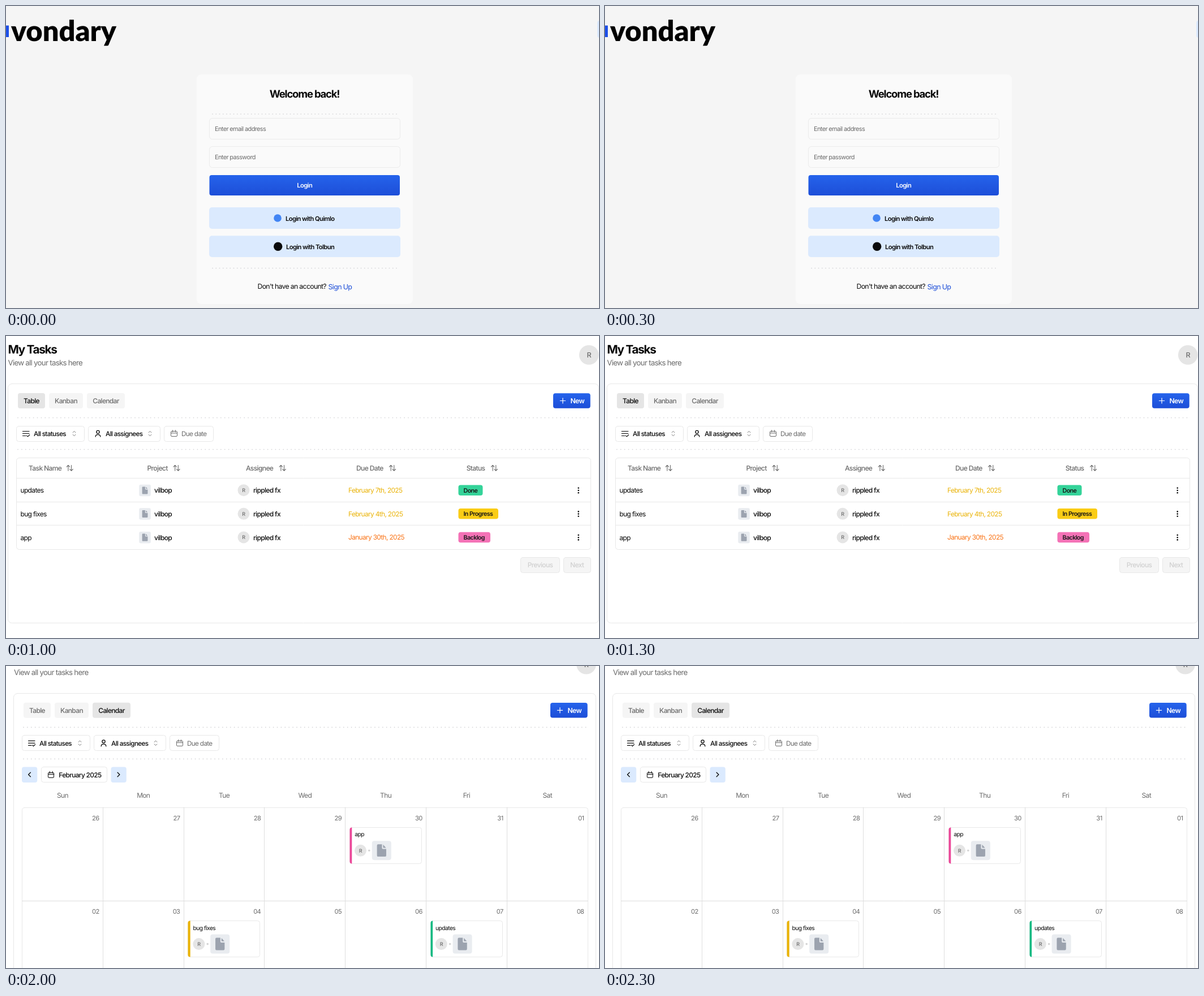
These frames come from a looping animation (1048 px wide and 534 px high, 2.5 s). An HTML page with a canvas:

```html
<!DOCTYPE html>
<html lang="en">
<head>
<meta charset="utf-8">
<title>Task manager tour</title>
<style>
  html, body { margin: 0; width: 100%; height: 100%; overflow: hidden; background: #fff; }
  canvas { display: block; width: 1048px; height: 534px; }
</style>
</head>
<body>
<canvas id="stage" width="1048" height="534"></canvas>
<script>
const ctx = document.getElementById('stage').getContext('2d');
const W = 1048, H = 534, HOLD = 500;
const INK = '#0a0a0a', GRAY = '#6b6b6b', LINE = '#e8e8e8', FILL = '#e5e5e5', PALE = '#f5f5f5', SKY = '#dbeafe';
const BLUE = '#1d4ed8', GREEN = '#10b981', YELLOW = '#eab308', ORANGE = '#f97316';
const BRAND = 'vondary', PROJECT = 'vilbop', USER = 'rippled fx';
const TASKS = [
  { name: 'updates', days: 12, due: 'February 7th, 2025', tone: YELLOW, status: 'Done', fill: '#34d399', badge: 43 },
  { name: 'bug fixes', days: 9, due: 'February 4th, 2025', tone: YELLOW, status: 'In Progress', fill: '#facc15', badge: 70.5 },
  { name: 'app', days: 4, due: 'January 30th, 2025', tone: ORANGE, status: 'Backlog', fill: '#f472b6', badge: 56.5 }
];

// y is the middle of the capitals
function text(s, x, y, size = 12, weight = 400, color = INK, align = 'left') {
  ctx.font = `${weight} ${size}px Inter, sans-serif`;
  ctx.letterSpacing = `${size * (size > 16 ? -0.065 : -0.055)}px`;
  ctx.textAlign = align;
  ctx.fillStyle = color;
  ctx.fillText(s, x, y + size * 0.36);
}

function brand(x, base, size, align) {
  ctx.font = `900 ${size}px Lato, sans-serif`;
  ctx.letterSpacing = '0px';
  ctx.textAlign = align;
  ctx.fillStyle = '#000';
  ctx.fillText(BRAND, x, base);
}

// Outlined boxes snap to pixel centres to keep a crisp hairline
function box(x1, y1, x2, y2, r, fill, stroke) {
  if (stroke) [x1, y1, x2, y2] = [x1, y1, x2, y2].map(v => Math.floor(v) + 0.5);
  ctx.beginPath();
  ctx.roundRect(x1, y1, x2 - x1, y2 - y1, r);
  if (fill) { ctx.fillStyle = fill; ctx.fill(); }
  if (stroke) { ctx.strokeStyle = stroke; ctx.lineWidth = 1; ctx.stroke(); }
}

function disc(x, y, r, fill) {
  ctx.beginPath();
  ctx.arc(x, y, r, 0, 7);
  ctx.fillStyle = fill;
  ctx.fill();
}

function ring(x, y, r, color, dash = []) {
  ctx.beginPath();
  ctx.arc(x, y, r, 0, Math.PI * 2);
  ctx.strokeStyle = color;
  ctx.lineWidth = 1.3;
  ctx.setLineDash(dash);
  ctx.stroke();
  ctx.setLineDash([]);
}

// Each path is a flat list of x, y offsets from the centre
function lines(x, y, color, width, ...paths) {
  ctx.beginPath();
  for (const p of paths)
    for (let i = 0; i < p.length; i += 2)
      i ? ctx.lineTo(x + p[i], y + p[i + 1]) : ctx.moveTo(x + p[i], y + p[i + 1]);
  ctx.strokeStyle = color;
  ctx.lineWidth = width;
  ctx.stroke();
}

function dots(x1, x2, y, step = 6.9) {
  for (let x = x1; x <= x2; x += step) disc(x, y, 0.85, '#d0d0d3');
}

function dotsDown(x, y1, y2, step) {
  for (let y = y1; y <= y2; y += step) disc(x, y, 0.85, '#d0d0d3');
}

function plus(x, y, r, color, width = 1.2) {
  lines(x, y, color, width, [-r, 0, r, 0], [0, -r, 0, r]);
}

function addDisc(x, y) {
  disc(x, y, 6.6, '#6f6f6f');
  plus(x, y, 3.4, '#fff', 1.4);
}

function blueFill(y1, y2) {
  const g = ctx.createLinearGradient(0, y1, 0, y2);
  g.addColorStop(0, '#2563eb');
  g.addColorStop(1, BLUE);
  return g;
}

function avatar(x, y, r = 10.5, size = 9) {
  disc(x, y, r, FILL);
  text('R', x, y, size, 500, GRAY, 'center');
}

function upDown(x, y) {
  lines(x, y, '#777', 1, [-2.4, -1.8, 0, -4.2, 2.4, -1.8], [-2.4, 1.8, 0, 4.2, 2.4, 1.8]);
}

function sortIcon(x, y) {
  lines(x, y, GRAY, 1.1, [-5.5, -2, -2.8, -4.8, -0.1, -2], [-2.8, -4.8, -2.8, 5],
    [0.1, 2.2, 2.8, 5, 5.5, 2.2], [2.8, 5, 2.8, -4.8]);
}

function calendar(x, y, s, color) {
  const r = s / 2;
  box(x - r, y - r * 0.8, x + r, y + r, s * 0.14, null, color);
  lines(x, y, color, 1, [-r, -r * 0.15, r, -r * 0.15],
    [-r * 0.45, -r * 1.15, -r * 0.45, -r * 0.5], [r * 0.45, -r * 1.15, r * 0.45, -r * 0.5]);
}

function person(x, y) {
  ring(x, y - 2.8, 2.6, INK);
  ctx.beginPath();
  ctx.moveTo(x - 4.3, y + 5.6);
  ctx.bezierCurveTo(x - 4.3, y + 0.6, x + 4.3, y + 0.6, x + 4.3, y + 5.6);
  ctx.stroke();
}

function fileTile(x, y, s) {
  box(x, y, x + s, y + s, s * 0.12, '#e9ecf0');
  ctx.save();
  ctx.translate(x + s * 0.26, y + s * 0.18);
  ctx.scale(s * 0.48, s * 0.64);
  ctx.fillStyle = '#9ca3af';
  ctx.beginPath();
  ctx.moveTo(0.12, 0);
  ctx.lineTo(0.54, 0);
  ctx.lineTo(0.54, 0.3);
  ctx.quadraticCurveTo(0.54, 0.38, 0.64, 0.38);
  ctx.lineTo(1, 0.38);
  ctx.lineTo(1, 0.9);
  ctx.quadraticCurveTo(1, 1, 0.87, 1);
  ctx.lineTo(0.12, 1);
  ctx.quadraticCurveTo(0, 1, 0, 0.9);
  ctx.lineTo(0, 0.1);
  ctx.quadraticCurveTo(0, 0, 0.12, 0);
  ctx.fill();
  ctx.beginPath();
  ctx.moveTo(0.66, 0.02);
  ctx.lineTo(0.98, 0.28);
  ctx.lineTo(0.66, 0.28);
  ctx.fill();
  ctx.restore();
}

function stats(x, y, s) {
  const items = [['Total Tasks', 3, 74], ['Assigned Tasks', 3, 99], ['Completed Tasks', 1, 109],
    ['Incomplete Tasks', 2, 109], ['Overdue Tasks', 0, 95]];
  const col = 191 * s, left = x - 19.7 * s, top = y - 29 * s, bottom = y + 62 * s;
  box(left, top, left + 5 * col + 1, bottom, 6, '#fff', LINE);
  items.forEach(([name, n, at], i) => {
    const cx = x + col * i, tx = cx + at * s, dir = n ? 1 : -1, tone = n ? GREEN : '#ef4444';
    text(name, cx, y, 12.15 * s, 500, GRAY);
    ctx.beginPath();
    ctx.moveTo(tx - 4 * s, y + 2 * s * dir);
    ctx.lineTo(tx, y - 2.3 * s * dir);
    ctx.lineTo(tx + 4 * s, y + 2 * s * dir);
    ctx.fillStyle = tone;
    ctx.fill();
    text(n, tx + 9 * s, y, 12.5 * s, 500, tone);
    text(n, cx, y + 29 * s, 23.5 * s, 700);
    dotsDown(left + col * (i + 1), top + 3, bottom - 1, 6.3 * s);
  });
}

function select(x, y, w, label, textX, arrows = true) {
  box(x + 0.5, y - 13.5, x + w, y + 13.5, 4, '#fff', LINE);
  text(label, x + textX, y, 11.7, arrows ? 500 : 400, arrows ? INK : GRAY);
  if (arrows) upDown(x + w - 17.5, y);
}

function toolbar(x, y, active, newX, endX, projects) {
  [['Table', 0, 48], ['Kanban', 55, 60], ['Calendar', 122, 67]].forEach(([name, dx, w]) => {
    const on = name === active;
    box(x + dx, y - 13.5, x + dx + w, y + 13.5, 4, on ? FILL : PALE);
    text(name, x + dx + w / 2, y, 12, 500, on ? INK : GRAY, 'center');
  });
  box(newX, y - 13.2, newX + 65.7, y + 13.2, 4, blueFill(y - 13, y + 13));
  plus(newX + 17, y, 4.6, '#fff', 1.2);
  text('New', newX + 30.5, y, 12.2, 600, '#fff');
  dots(x, endX, y + 30);
  dots(x, endX, y + 86);

  const fy = y + 58;
  select(x - 3, fy, 120, 'All statuses', 31);
  lines(x + 14.5, fy, INK, 1.2, [-6, -4, 5.5, -4], [-6, 0, 5.5, 0], [-6, 4, -0.5, 4], [1, 3.6, 3, 5.4, 6.2, 2.3]);
  select(x + 124, fy, 127, 'All assignees', 31);
  person(x + 141.5, fy);
  let dx = x + 258;
  if (projects) {
    select(dx, fy, 117, 'All projects', 31.5);
    lines(dx + 18, fy, INK, 1.2, [-5.5, 4.8, -5.5, -4.6, -1.6, -4.6, 0, -2.8, 5.5, -2.8, 5.5, 4.8, -5.5, 4.8]);
    dx += 124;
  }
  select(dx, fy, 87, 'Due date', 31, false);
  calendar(dx + 18, fy, 10.5, GRAY);
}

function login() {
  box(0, 0, W, H, 0, PALE);
  box(-16, 34.5, 5, 55, 0, '#1d4fe8');
  brand(9, 62, 50.5, 'left');
  box(1045, 26, 1070, 56, 4, SKY);
  box(337, 121, 719, 527, 8, '#fafafa');
  text('Welcome back!', 527.5, 155.5, 18.5, 700, INK, 'center');
  dots(365, 693, 191, 6.25);
  dots(365, 693, 463.5, 6.25);
  ['Enter email address', 'Enter password'].forEach((label, i) => {
    const y = 217 + 50 * i;
    box(359.5, y - 19, 696.5, y + 18.7, 5, null, '#ebebeb');
    text(label, 369, y, 10.9, 400, GRAY);
  });
  box(359.5, 299, 696, 335, 4, blueFill(299, 335));
  text('Login', 527.7, 317.2, 11.2, 600, '#fff', 'center');
  box(359, 356, 697, 394, 5, SKY);
  disc(480, 375, 6.8, '#4285f4');
  text('Login with Quimlo', 494, 375.5, 11.2, 600);
  box(359, 406.3, 697, 444, 5, SKY);
  disc(480.7, 425.3, 7.7, INK);
  text('Login with Tolbun', 495, 425.7, 11.2, 600);
  text("Don't have an account?", 444.5, 496, 12.25);
  text('Sign Up', 569.5, 496, 12.5, 400, BLUE);
}

function home() {
  box(0, 0, 136.5, H, 0, PALE);
  brand(117, 45, 35, 'right');
  [69.5, 157, 323].forEach(y => dots(1, 121, y, 6.25));
  addDisc(115.7, 91);
  addDisc(115.7, 344.3);
  box(-10, 105.5, 124, 143.7, 4, SKY);
  text('ure', 11.5, 125, 11, 500, INK, 'right');
  upDown(113.5, 124.5);
  box(-10, 170.5, 124, 205.5, 4, SKY);
  text('Home', 9, 188, 12.3, 600, BLUE, 'right');
  text('My Tasks', 22, 223, 12.3, 500, INK, 'right');
  text('Settings', 17, 257.5, 12.3, 500, INK, 'right');
  text('Members', 23.5, 292.5, 12.3, 500, INK, 'right');
  text(PROJECT, 19, 383, 12.3, 400, GRAY, 'right');

  text('Home', 155.5, 17.4, 19.1, 700);
  text('Monitor all of your projects and tasks here', 155.5, 39.5, 12.35, 400, GRAY);
  stats(175.2, 103.5, 1);

  box(155.5, 179.5, 627.5, 530, 6, null, LINE);
  text('Tasks (3)', 169, 204, 14.3, 700);
  box(588.7, 192, 614.5, 217.7, 4, SKY);
  plus(601.5, 204.8, 4.5, '#7c8aa0', 1);
  dots(171, 614, 230.5, 6.25);
  TASKS.forEach((t, i) => {
    const y = 244 + 80.5 * i;
    box(168.5, y, 614, y + 67.5, 5, '#fff', LINE);
    text(t.name, 182, y + 24.3, 14.2, 500);
    text(PROJECT, 182, y + 45.3, 12.2, 500);
    disc(221.5, y + 45.5, 1.7, '#d4d4d4');
    calendar(234.3, y + 45.8, 8.2, GRAY);
    text(`${t.days} days`, 242, y + 45.5, 11.2, 400, GRAY);
  });
  box(168.5, 485.5, 614.5, 517.5, 4, SKY);
  text('Show All', 391.3, 501.7, 11.4, 600, '#404854', 'center');

  box(640.5, 179.5, 1080, 321.5, 6, null, LINE);
  text('Projects (1)', 653.3, 204, 14.3, 700);
  dots(655, W, 230.5, 6.25);
  box(653.5, 244, 869.5, 308, 5, '#fff', LINE);
  fileTile(667, 257.3, 38);
  text(PROJECT, 712, 277, 14.4, 500);
}

function table() {
  text('My Tasks', 3.5, 23.6, 20.8, 700);
  text('View all your tasks here', 3.5, 47, 13.3, 400, GRAY);
  avatar(1030.2, 33.5, 17.3, 12.5);
  box(3.5, 84.8, 1047, 507, 7, null, LINE);
  toolbar(21, 114.5, 'Table', 967, 1030);

  box(18.5, 215.3, 1033, 377, 5, null, LINE);
  [251.5, 293.5, 334.5].forEach(y => lines(0, y, LINE, 1, [18.5, 0, 1033, 0]));
  [['Task Name', 40, 112.7], ['Project', 249.5, 301.5], ['Assignee', 424, 488.7],
    ['Due Date', 619, 683], ['Status', 813.7, 863]].forEach(([name, x, icon]) => {
    text(name, x, 234, 12.1, 500, GRAY);
    sortIcon(icon, 233.3);
  });
  TASKS.forEach((t, i) => {
    const y = 273 + 41.6 * i;
    text(t.name, 25.5, y, 12);
    fileTile(235.3, y - 10.3, 20.5);
    text(PROJECT, 262, y, 12, 500);
    avatar(420, y - 0.3);
    text(USER, 437, y, 12, 500);
    text(t.due, 605, y, 11.9, 400, t.tone);
    box(799.5, y - 9.5, 799.5 + t.badge, y + 9, 4, t.fill);
    text(t.status, 808.5, y, 10.7, 600, '#171717');
    [-4.2, 0, 4.2].forEach(d => disc(1011.7, y + d, 1.3, INK));
  });
  [['Previous', 909.5, 978.5], ['Next', 985.3, 1033]].forEach(([name, a, b]) => {
    box(a, 391.3, b, 418, 4, PALE, LINE);
    text(name, (a + b) / 2, 404.7, 12, 500, '#d0d0d0', 'center');
  });
}

function statusIcon(i, x, y) {
  const tone = ['#f472b6', '#f87171', '#facc15', '#60a5fa', '#34d399'][i];
  ring(x, y, 6.6, tone, i === 0 || i === 2 ? [3.6, 1.6] : []);
  if (i === 2 || i === 3) disc(x, y, 1.5, tone);
  if (i === 4) lines(x, y, tone, 1.2, [-2.6, 0.2, -0.7, 2, 2.8, -1.8]);
}

function kanban() {
  text('View tasks of your project here', 14.7, 11.3, 13.3, 400, GRAY);
  avatar(1026.8, -2.7, 17.3, 12.5);
  fileTile(14.3, 48.7, 27.5);
  text(PROJECT, 48, 62.5, 16, 600);
  box(939, 48.5, 1044, 76, 4, SKY);
  lines(957, 62.3, INK, 1.2, [-5.6, 5.6, -4.6, 1.8, 2.8, -5.4, 5.4, -2.8, -1.8, 4.6, -5.6, 5.6], [1, -3.6, 3.6, -1]);
  text('Edit Project', 971, 62.7, 12.3, 600);
  stats(36, 121, 1.0765);

  box(14.5, 202.5, 1044, 560, 7, null, LINE);
  toolbar(32, 231.5, 'Kanban', 963.2, 1028, true);
  const cols = [['Backlog', 91.5, 2], ['Todo', 75], ['In Progress', 107, 1], ['In Review', 98.7], ['Done', 77, 0]];
  cols.forEach(([name, pill, task], i) => {
    const x = 35.5 + 200.2 * i, t = TASKS[task];
    box(x, 332, x + 186.5, 560, 4, SKY);
    statusIcon(i, x + 20, 350.7);
    text(name, x + 34, 351.3, 12, 500);
    box(x + pill - 8.8, 342.3, x + pill + 8.8, 359.5, 4, FILL);
    text(t ? 1 : 0, x + pill, 351, 10.5, 500, '#404040', 'center');
    plus(x + 165.8, 350.7, 4.7, '#666', 1.1);
    if (!t) return;
    box(x + 5.5, 370, x + 181.5, 490.5, 3, '#fff');
    text(t.name, x + 14, 387, 12);
    [-4.4, 0, 4.4].forEach(d => disc(x + 165.3 + d, 385.5, 1.2, '#333'));
    dots(x + 18, x + 169, 406.3);
    avatar(x + 24, 427.8);
    disc(x + 41.3, 428, 1.8, '#d4d4d4');
    text(t.due, x + 48, 429, 10.3, 400, t.tone);
    fileTile(x + 13.8, 448, 34.3);
    text(PROJECT, x + 53, 465.3, 10.6, 500);
  });
}

function event(t, x, y, tone) {
  ctx.save();
  box(x, y, x + 127, y + 64, 4, '#fff', LINE);
  ctx.clip();
  box(x - 1, y - 1, x + 3.8, y + 65, 0, tone);
  ctx.restore();
  text(t.name, x + 8.7, y + 12.7, 10.3);
  avatar(x + 19, y + 41.3);
  disc(x + 34.3, y + 41.3, 1.8, '#d4d4d4');
  fileTile(x + 39.3, y + 24.2, 34);
}

function month() {
  text('View all your tasks here', 14, 11.3, 13.3, 400, GRAY);
  avatar(1025.5, -2.7, 17.3, 12.5);
  box(13.5, 48.8, 1042.5, 560, 7, null, LINE);
  toolbar(31, 78.3, 'Calendar', 962, 1027);

  box(28, 178.5, 55.3, 206, 4, SKY);
  lines(41.5, 192, INK, 1.3, [1.9, -3.8, -1.9, 0, 1.9, 3.8]);
  box(62.5, 178.8, 178.7, 205.7, 4, '#fff', LINE);
  calendar(79.7, 192.3, 10.5, INK);
  text('February 2025', 93.3, 192.3, 11.9, 500);
  box(185.5, 178.5, 212.8, 206, 4, SKY);
  lines(199, 192, INK, 1.3, [-1.9, -3.8, 1.9, 0, -1.9, 3.8]);

  const left = 28.5, step = 142.8;
  box(left, 250.3, left + 7 * step, 600, [4, 4, 0, 0], null, LINE);
  lines(0, 415.5, '#dedede', 1, [left, 0, left + 7 * step, 0]);
  ['Sun', 'Mon', 'Tue', 'Wed', 'Thu', 'Fri', 'Sat'].forEach((day, i) => {
    const x = left + step * i;
    text(day, x + step / 2, 228.5, 12, 400, GRAY, 'center');
    if (i) lines(Math.floor(x) + 0.5, 250, '#dedede', 1, [0, 0, 0, 300]);
    [(25 + i) % 31 + 1, i + 2].forEach((n, row) =>
      text(String(n).padStart(2, '0'), x + step - 6.7, 268.8 + 165.5 * row, 11.2, 400, GRAY, 'right'));
  });
  event(TASKS[2], left + step * 4 + 7.8, 285, '#ec4899');
  event(TASKS[1], left + step * 2 + 7.8, 450.3, YELLOW);
  event(TASKS[0], left + step * 5 + 7.8, 450.3, GREEN);
}

const scenes = [login, home, table, kanban, month];
const start = performance.now();

function frame() {
  const t = (performance.now() - start) % (HOLD * scenes.length);
  ctx.textRendering = 'geometricPrecision';
  ctx.lineJoin = ctx.lineCap = 'round';
  box(0, 0, W, H, 0, '#fff');
  scenes[Math.floor(t / HOLD)]();
  requestAnimationFrame(frame);
}
frame();
</script>
</body>
</html>
```
